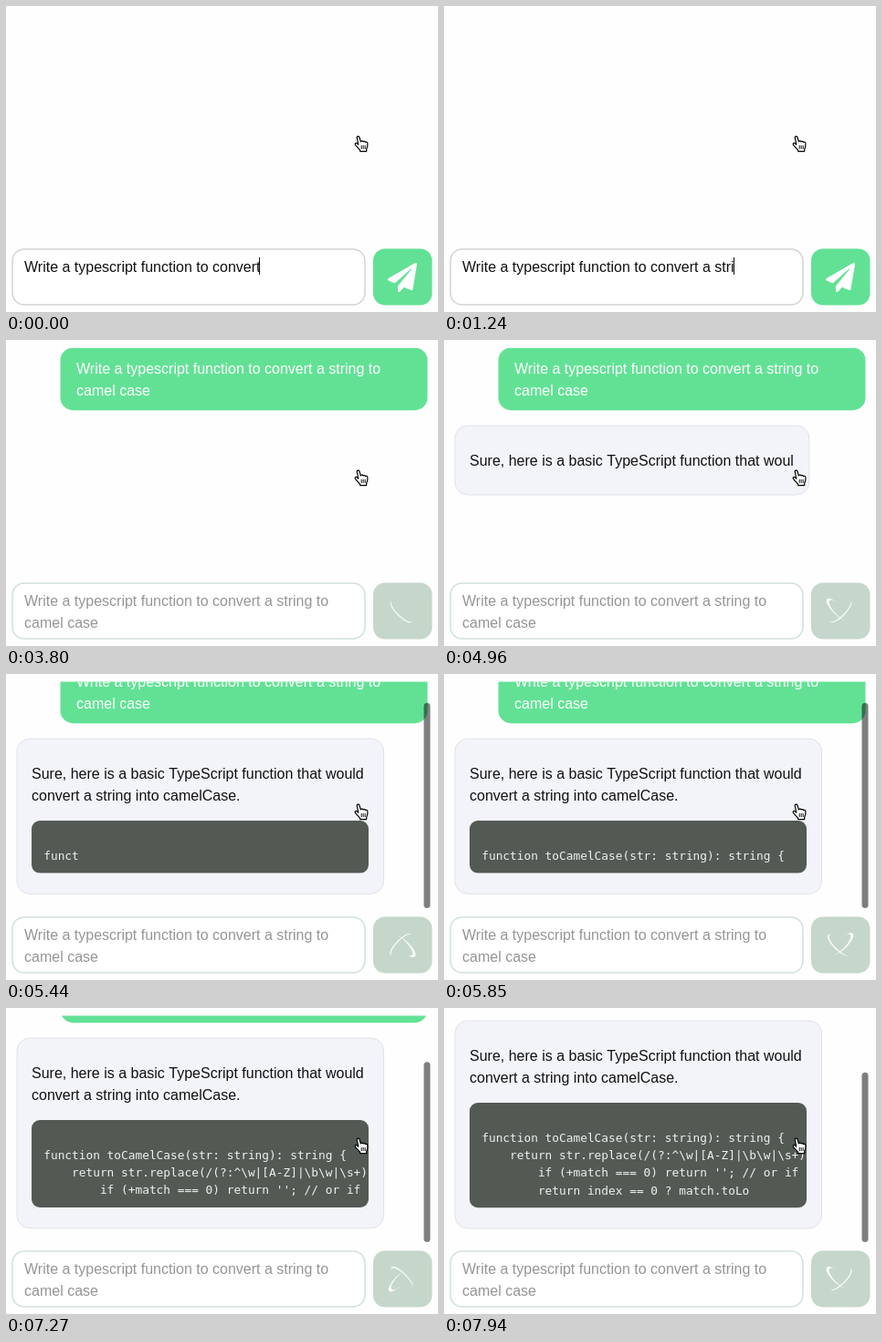
An HTML page with a canvas for the animation above (8000 ms loop, 473 px wide and 336 px high).

```html
<!DOCTYPE html>
<html lang="en">
<head>
<meta charset="utf-8">
<title>Chat</title>
<style>
html, body { margin: 0; width: 100%; height: 100%; overflow: hidden; background: #fefefe; }
canvas { display: block; }
</style>
</head>
<body>
<canvas id="stage" width="473" height="336"></canvas>
<script>
const ctx = document.getElementById('stage').getContext('2d');
const LOOP = 8000;
const SANS = '16px "Liberation Sans", Arial, sans-serif';
const MONO = '12.82px "DejaVu Sans Mono", monospace';

const PROMPT = 'Write a typescript function to convert a string to camel case';
const PROMPT_START = 38;
const KEY_TIMES = [470, 570, 660, 760, 1030, 1180, 1240, 1410, 1490, 1560, 1710, 1780,
  1840, 1910, 1970, 2120, 2270, 2510, 2810, 2900, 2980, 3190, 3340];
const SENT = 3610;
const SPIN_START = 3560;

const ANSWER = 'Sure, here is a basic TypeScript function that would convert a string into camelCase.';
const CODE = [
  'function toCamelCase(str: string): string {',
  String.raw`    return str.replace(/(?:^\w|[A-Z]|\b\w|\s+)/g, function(match, index) {`,
  String.raw`        if (+match === 0) return ''; // or if (/\s+/.test(match)) for white spaces`,
  '        return index == 0 ? match.toLowerCase() : match.toUpperCase();'
].join('\n');
const FENCE = 6;
const ANSWER_START = 4417;
const CHARS_PER_MS = 0.0941;

const VIEW = { top: 8.5, bottom: 257.8 };
const CARD_TOP = 94;
const CODE_LINE = 19.2;

const PLANE = new Path2D('M476 3.2L12.5 270.6c-18.1 10.4-15.8 35.6 2.2 43.2L121 358.4l287.3-253.2' +
  'c5.5-4.9 13.3 2.6 8.6 8.3L176 407v80.5c0 23.6 28.5 32.9 42.5 15.8L282 426l124.6 52.2' +
  'c14.2 6 30.4-2.9 33-18.2l72-432C515 7.8 493.3-6.8 476 3.2z');
const HAND = new Path2D('M3.2 2.2C3.6.8 5.6.8 6 2.2L7.3 6.8C8 5.8 9.6 6 10 7C11 6.2 12.2 6.6 12.5 7.6' +
  'C13.7 7 14.8 7.6 14.9 9C15.2 11.5 14.8 13 13.8 15L13.6 17.6H6.8L6.6 16.2' +
  'C5 14.2 3 12.4 1.4 10.4C.6 9 2 8 3.2 8.8L4.8 10.2Z');
const KNUCKLES = new Path2D('M8.2 11v4M10.2 11v4M12.2 11v4');

function box(x, y, w, h, r, fill, stroke, line = 1) {
  ctx.beginPath();
  ctx.roundRect(x, y, w, h, r);
  if (fill) { ctx.fillStyle = fill; ctx.fill(); }
  if (stroke) { ctx.strokeStyle = stroke; ctx.lineWidth = line; ctx.stroke(); }
}

function wrap(text, width) {
  const lines = [];
  let line = null;
  for (const word of text.split(' ')) {
    const next = line === null ? word : line + ' ' + word;
    if (line !== null && ctx.measureText(next).width > width) {
      lines.push(line);
      line = word;
    } else line = next;
  }
  return [...lines, line];
}

function drawLines(lines, x, y, step, color) {
  ctx.fillStyle = color;
  lines.forEach((line, i) => ctx.fillText(line, x, y + i * step));
}

function drawInput(t) {
  const busy = t >= SENT;
  const typed = PROMPT_START + KEY_TIMES.filter(k => k <= t).length;
  ctx.font = SANS;
  box(7, 267, 386, 61, 13, '#fff', busy ? '#cfe2d8' : '#d4d4d4', 1.5);
  const lines = wrap(PROMPT.slice(0, typed), 360);
  drawLines(lines, 20, 292, 24, busy ? '#959595' : '#111');
  if (!busy) {
    const x = 20 + ctx.measureText(lines[lines.length - 1]).width;
    ctx.fillRect(Math.floor(x - 0.5), 276 + (lines.length - 1) * 24, 1, 19);
  }
}

// Shadow offset: travels around a square once per turn, from -1 to 1.
function sway(turn) {
  const p = turn - Math.floor(turn);
  return Math.max(-1, Math.min(1, 8 * Math.abs(p - 0.5) - 2));
}

// A disc's offset shadow, seen outside the disc only, flattened by its tilt.
function drawOrbit(scaleX, scaleY, turn) {
  if (turn < 0) return;
  const r = 16, shift = 3.2;
  ctx.save();
  ctx.translate(433.5, 297.5);
  ctx.rotate(Math.PI / 4);
  ctx.scale(scaleX, scaleY);
  ctx.beginPath();
  ctx.rect(-60, -60, 120, 120);
  ctx.arc(0, 0, r, 0, Math.PI * 2);
  ctx.clip('evenodd');
  ctx.beginPath();
  ctx.arc(shift * sway(turn), shift * sway(turn - 0.25), r, 0, Math.PI * 2);
  ctx.fill();
  ctx.restore();
}

function drawButton(t) {
  const busy = t >= SENT;
  box(402, 266.5, 64.5, 62, 13, busy ? '#c5d7ca' : '#62e195');
  ctx.fillStyle = '#fff';
  if (busy) {
    const turn = (t - SPIN_START) / 1000;
    const flat = Math.cos(70 * Math.PI / 180);
    drawOrbit(1, flat, turn);
    drawOrbit(flat, 1, turn - 0.4);
  } else {
    ctx.save();
    ctx.translate(418, 282);
    ctx.scale(0.0625, 0.0625);
    ctx.fill(PLANE);
    ctx.restore();
  }
}

function drawCode(lines, top) {
  const height = (lines.length + 1) * CODE_LINE + 19.2;
  box(28, top, 369, height, 9, '#535a54');
  ctx.save();
  ctx.beginPath();
  ctx.rect(28, top, 368.5, height);
  ctx.clip();
  ctx.font = MONO;
  drawLines(lines, 41.2, top + 9.6 + CODE_LINE + 14.2, CODE_LINE, '#f0f0f0');
  ctx.restore();
}

function drawChat(t) {
  const count = Math.floor((t - ANSWER_START) * CHARS_PER_MS);
  const answering = count > 0;
  const codeCount = count - ANSWER.length - FENCE;
  const hasCode = codeCount >= 0;
  const code = hasCode ? CODE.slice(0, codeCount).replace(/\n$/, '').split('\n') : [];

  ctx.font = SANS;
  const text = ANSWER.slice(0, Math.max(0, count));
  const lines = wrap(text, 370);
  const height = hasCode
    ? 90 + (code.length + 1) * CODE_LINE + 19.2 + 22.8
    : 52 + lines.length * 24;
  const overflow = Math.round(CARD_TOP + height + 16 - VIEW.bottom);
  const scroll = answering ? Math.max(0, overflow) : 0;

  ctx.save();
  ctx.beginPath();
  ctx.rect(0, VIEW.top, 473, VIEW.bottom - VIEW.top);
  ctx.clip();
  ctx.translate(0, -scroll);
  box(59.5, 8.5, 402, 68.7, 14, '#62e195');
  drawLines(wrap(PROMPT, 360), 77, 37, 24, '#fff');
  if (answering) {
    const right = Math.min(413.5, 45 + ctx.measureText(text).width);
    box(12, CARD_TOP, right - 12, height, 14, '#f3f4f9', '#dfe2e8');
    drawLines(lines, 28, CARD_TOP + 44, 24, '#111');
    if (hasCode) drawCode(code, CARD_TOP + 90);
  }
  ctx.restore();

  if (scroll > 0) {
    const thumb = 246 * 250 / (250 + scroll);
    box(457.5, 257 - thumb, 7, thumb, 3.5, 'rgba(0, 0, 0, 0.5)');
  }
}

function drawHand() {
  ctx.save();
  ctx.translate(381, 142);
  ctx.fillStyle = '#fff';
  ctx.strokeStyle = '#000';
  ctx.lineJoin = 'round';
  ctx.lineWidth = 1.2;
  ctx.fill(HAND);
  ctx.stroke(HAND);
  ctx.lineWidth = 0.9;
  ctx.stroke(KNUCKLES);
  ctx.restore();
}

function draw(t) {
  ctx.fillStyle = '#fefefe';
  ctx.fillRect(0, 0, 473, 336);
  if (t >= SENT) drawChat(t);
  drawInput(t);
  drawButton(t);
  drawHand();
}

const start = performance.now();
function tick() {
  draw((performance.now() - start) % LOOP);
  requestAnimationFrame(tick);
}
tick();
</script>
</body>
</html>
```
